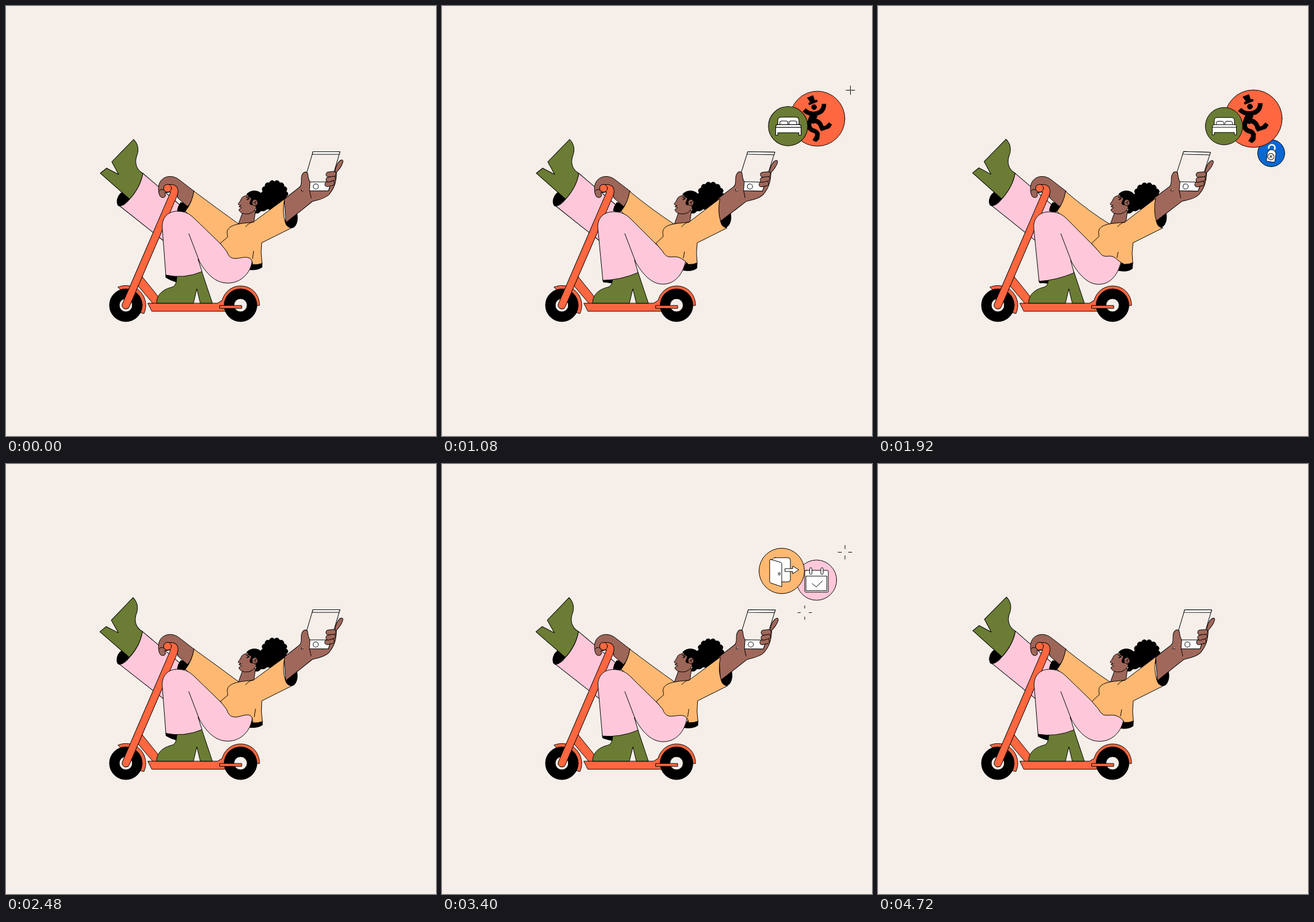
Write an HTML page that moves like this. It is 748x748 px and loops after 4800 ms.

```html
<!DOCTYPE html>
<html lang="en">
<head>
<meta charset="utf-8">
<title>Scooter ride</title>
<style>
html, body { margin: 0; width: 100%; height: 100%; overflow: hidden; background: #f5eee9 }
svg { display: block; width: 100vw; height: 100vh; stroke: #000; stroke-linejoin: round; stroke-linecap: round }
.bg { fill: #f5eee9 } .red { fill: #ff6740 } .green { fill: #6b7c34 } .pink { fill: #ffc8da }
.peach { fill: #ffb871 } .skin { fill: #9c6659 } .blue { fill: #0a68d2 } .white { fill: #fff }
#frontArm .skin { fill: #a0685b }
.line { fill: none }
.limb { fill: none; stroke-width: 8 }
</style>
</head>
<body>
<svg viewBox="0 0 748 748">
  <g id="backLeg">
    <path d="M204 323C194 328 191 340 195 347L200 349L216 335Z"/>
    <path class="pink" d="M238 291L306 349L300 410L276 410L198 348Q207 347 215 336Q234 315 238 291Z"/>
    <path class="green" d="M222 232C231 241 231 252 227 262C223 276 229 286 238 291Q234 315 215 336L164 291L175 282L196 293L184 271Z"/>
  </g>

  <path d="M304 342Q299 348 298 356Q305 360 313 357L320 346Z"/>
  <path class="skin" d="M327 322L301 302C288 292 270 296 266 311C264 320 266 332 271 333C277 334 279 330 276 325L296 322L299 334L316 349Q325 338 327 322Z"/>
  <path class="line" d="M266 322Q270 317 274 320"/>
  <path id="backSleeve" class="peach"/>

  <g id="scooter">
    <path class="red" d="M195 489A34.5 34.5 0 0 1 240 535L232 533L200 494Z"/>
    <path class="red" d="M237 471L266 507L262 518H256L229 486Z"/>
    <path class="red" d="M247 517H368L376 512C380 497 393 487 408 487C427 487 441 501 441 521H430L400 531H254Z"/>
    <g id="wheels"></g>
    <path class="red" d="M372 521H410V526H372Z"/>
    <g id="stem"></g>
    <circle class="red" cx="281" cy="317" r="6.800"/>
  </g>

  <path class="green" d="M297 468C297 481 295 487 289 489C276 492 262 500 262 517H326L332 492L338 517H359L340 460Z"/>
  <path id="hem"/>
  <path id="trouserCuff"/>
  <path id="frontLeg" class="pink"/>
  <path class="line" d="M318 396L336 443"/>

  <g id="head">
    <g id="bun"></g>
    <path d="M445 335L475 350Q465 357 455 353L445 356Z"/>
    <path class="skin" d="M412 358L404 380L430 385L434 356Z"/>
    <path class="skin" d="M424 326C417 331 413 330 410 334Q407 341 404 344Q404 347 409 347L405 349L410 351L405 354C407 361 415 363 424 361Q433 358 438 345L434 328Z"/>
    <path d="M419 327C426 320 437 320 444 326L455 352Q450 358 444 356Q439 362 434 360C437 352 435 347 431 345Q425 348 424 343L427 335Z"/>
    <ellipse class="skin" cx="433" cy="342" rx="5" ry="5.500"/>
    <path class="line" d="M431 343Q433 339 436 340M433 341L434 345"/>
    <path class="line" d="M418 332L423 335L419 337M421 331L424 333" stroke-width="1.400"/>
  </g>

  <g id="frontArm">
    <path d="M484 374L506 361C509 372 505 385 497 386Q487 385 484 374Z"/>
    <path class="skin" d="M484 336L512 314L527 298L575 288C575 308 570 318 562 328C554 336 540 338 533 340L487 377Z"/>
    <path class="skin" d="M573 292C571 282 578 270 583 268Q587 267 586 272Q583 281 575 289Z"/>
    <path class="bg" d="M534 253.500H581L561 321.500H514Z"/>
    <path class="white" d="M534 253.500H581L579.700 258H532.700ZM518.600 306H565.600L561 321.500H514Z"/>
    <circle class="white" cx="539" cy="314" r="4.500"/>
    <g id="fingers"></g>
    <path class="skin" d="M511 315C517 308 511 299 516 292C519 287 525 288 525 293C526 299 526 302 529 306L528 321L531 334"/>
  </g>
  <path id="shirt" class="peach"/>
  <path id="fold" class="line"/>
  <path class="line" d="M417 384Q421 378 429 376"/>

  <g id="bubbles">
    <g data-in="1080" data-out="2000" data-centre="684 256">
      <circle class="blue" cx="684" cy="256" r="23.500"/>
      <g transform="rotate(8 684 258)">
        <path class="line" d="M678 248V247A5.500 5.500 0 1 1 687 251" stroke="#fff" stroke-width="2.500"/>
        <path class="white" d="M677 255L681 250H688L692 255V269Q692 271 690 271H679Q677 271 677 269Z"/>
        <circle class="white" cx="684" cy="262" r="5.500"/>
        <path d="M682 260L686 264M686 260L682 264"/>
      </g>
    </g>
    <g data-in="1000" data-out="2000" data-centre="653 196">
      <circle class="red" cx="653" cy="196" r="50"/>
      <path d="M635 158L645 154L648 163L652 162L653 165L638 171L637 168L640 166Z"/>
      <circle cx="647" cy="175" r="4.500"/>
      <g class="limb" stroke-linecap="butt">
        <path d="M629 180Q637 188 648 187Q665 185 665 169"/>
        <path d="M648 188Q643 195 641 204" stroke-width="13"/>
        <path d="M641 200Q657 197 661 213"/>
        <path d="M639 202Q635 213 644 217Q656 220 652 228"/>
      </g>
      <path d="M657 212L668 209L674 203L679 207L675 213L660 218ZM650 226L657 222L656 233L651 238L645 235Z"/>
    </g>
    <g data-in="960" data-out="2000" data-centre="602 209">
      <circle class="green" cx="602" cy="209" r="32.500"/>
      <g class="white">
        <path d="M585 208V199Q585 194 591 194H614Q620 194 620 199V208Z"/>
        <rect x="588.500" y="200.500" width="13" height="8" rx="3"/>
        <rect x="603.500" y="200.500" width="13" height="8" rx="3"/>
        <path d="M584 206.500H621Q623.500 207 623.500 210V224H620V220H585V224H581.500V210Q582 207 584 206.500Z"/>
        <path d="M582 211H623"/>
      </g>
    </g>
    <g data-in="3180" data-out="3840" data-centre="651 202">
      <circle class="pink" cx="651.500" cy="202" r="35"/>
      <g class="white">
        <rect x="631" y="185" width="41" height="38" rx="2"/>
        <rect x="633.500" y="195" width="36" height="25.500"/>
        <rect x="639.500" y="180.500" width="4" height="11.500" rx="2"/>
        <rect x="659" y="180.500" width="4" height="11.500" rx="2"/>
      </g>
      <path class="line" d="M644 208L651 214L662 203"/>
    </g>
    <g data-in="3120" data-out="3840" data-centre="591 186">
      <circle class="peach" cx="591" cy="186" r="39.500"/>
      <g class="white">
        <rect x="575" y="163" width="31" height="42" rx="4"/>
        <path d="M572 166L589 171Q591 172 591 174V213.500L572 207Q570 206 570 204V168Q570 166 572 166Z"/>
        <ellipse cx="586.500" cy="191" rx="1.500" ry="2.500"/>
        <path d="M597 182H610V177.500L620.500 184L610 191V187H597Z"/>
      </g>
    </g>
  </g>
  <path id="sparkles" class="line"/>
</svg>

<script>
const LOOP = 4800, SWAY = 800;
const $ = id => document.getElementById(id);
const clamp = x => Math.min(1, Math.max(0, x));
const wave = (t, low) => .5 - .5 * Math.cos((t - low) / SWAY * 2 * Math.PI);

// Each cloth shape swings between two paths of the same structure.
const legCloth = {
  trouserCuff: ['M278 467L278 472Q285 477 296 480L297 470Z',
                'M280 477L281 481Q287 481 295 482L297 473Z'],
  frontLeg: ['M278 468L272 388C270 368 282 357 298 357C312 357 320 362 328 370L384 424L429 436C429 462 410 482 386 482C364 482 348 466 334 440L341 462Q310 475 278 468Z',
             'M280 478L271 386C270 368 282 358 298 358C312 358 320 362 328 370L382 424L424 440C420 465 406 484 384 484C364 484 348 466 335 442L341 464Q310 477 280 478Z']
};
const shirtCloth = {
  backSleeve: ['M327 322Q366 350 405 379L392 402L374 415L312 357Q324 342 327 322Z',
               'M326 323Q371 363 403 380L390 402L372 416L311 357Q323 342 326 323Z'],
  hem: ['M429 447L446 447L446 454Q437 460 421 458Z',
        'M422 446L442 446L441 458Q433 465 417 461Z'],
  shirt: ['M430 376L485 336Q480 358 486 376Q488 385 497 386L445 412Q443 430 446 448Q438 451 429 450Q430 440 424 437C418 435 412 438 402 440C393 441 387 438 384 427L373 413L386 402C385 396 383 390 390 385C398 379 412 378 430 376Z',
          'M429 376L482 334Q478 357 484 376Q486 385 495 386L443 412Q440 430 442 446Q437 449 428 449Q421 450 417 446C412 442 412 434 403 433C396 433 393 437 384 427L371 413L384 400C383 394 382 389 388 384C396 378 412 378 429 376Z'],
  fold: ['M434 426L432 440', 'M411 429L409 437']
};

function mix([from, to], k) {
  const ends = to.match(/\d+/g);
  let i = 0;
  return from.replace(/\d+/g, n => (+n + (ends[i++] - n) * k).toFixed(2));
}

function swing(cloth, k) {
  for (const id in cloth) $(id).setAttribute('d', mix(cloth[id], k));
}

function tube(d, width, color) {
  return `<path class="line" d="${d}" stroke-width="${width}"/>` +
    `<path class="line" d="${d}" stroke="${color}" stroke-width="${width - 2}"/>`;
}

$('wheels').innerHTML = [208.5, 408].map(x =>
  `<circle cx="${x}" cy="520.500" r="28.500"/><circle class="bg" cx="${x}" cy="520.500" r="11.500"/>`).join('');
$('stem').innerHTML = tube('M281 317H287Q295.500 317 291.500 328L208.500 520.500', 14, '#ff6740');
$('fingers').innerHTML = ['M559 310L567 308', 'M561 302L569 299.500', 'M561 293L570 292']
  .map(d => tube(d, 9.5, '#a0685b')).join('');
$('bun').innerHTML = '<circle cx="467" cy="326" r="19"/>' +
  Array.from({ length: 14 }, (_, i) => {
    const a = i / 14 * 2 * Math.PI;
    return `<circle cx="${467 + 18.5 * Math.cos(a)}" cy="${326 + 19 * Math.sin(a)}" r="4.800"/>`;
  }).join('');

function popScale(p) {
  const q = clamp(p) - 1;
  return 1 + 2.2 * q ** 3 + 1.2 * q ** 2;
}

function placeBubble(bubble, t) {
  const start = +bubble.dataset.in, leave = +bubble.dataset.out;
  const [x, y] = bubble.dataset.centre.split(' ').map(Number);
  const away = Math.max(0, t - leave) / 80;
  const size = popScale((t - start) / 200), stretch = clamp(away);
  bubble.style.display = t > start && away < 3 ? '' : 'none';
  bubble.setAttribute('transform', `translate(${x + 44 * away ** 2} ${y}) ` +
    `scale(${size * (1 + .1 * stretch)} ${size * (1 - .07 * stretch)}) translate(${-x} ${-y})`);
}

function sparkle(x, y, start, t) {
  const p = (t - start) / 400;
  if (p <= 0 || p >= 1) return '';
  const outer = 12 * (1 - (1 - p) ** 5), inner = 12 * p ** 1.6;
  return [[1, 0], [-1, 0], [0, 1], [0, -1]].map(([u, v]) =>
    `M${x + u * inner} ${y + v * inner}L${x + u * outer} ${y + v * outer}`).join('');
}

function draw(t) {
  const kick = wave(t, 140), drift = 1.15 * wave(t, 90), sway = 1.3 * wave(t, 25);
  $('backLeg').setAttribute('transform', `rotate(${1.7 * (kick - .27)} 285 395)`);
  $('frontArm').setAttribute('transform', `translate(${-3 * sway} 0) rotate(${1.2 * sway} 540 287)`);
  $('bun').setAttribute('transform', `translate(${drift} ${7 * drift})`);
  swing(legCloth, sway);
  swing(shirtCloth, drift);
  for (const bubble of $('bubbles').children) placeBubble(bubble, t);
  $('sparkles').setAttribute('d', sparkle(710.5, 146.5, 1008, t) +
    sparkle(701, 153.5, 3140, t) + sparkle(631, 258.5, 3100, t));
}

const begin = performance.now();
function tick() {
  const t = (performance.now() - begin) % LOOP;
  draw(Math.floor(t / 40) * 40);
  requestAnimationFrame(tick);
}
tick();
</script>
</body>
</html>
```
